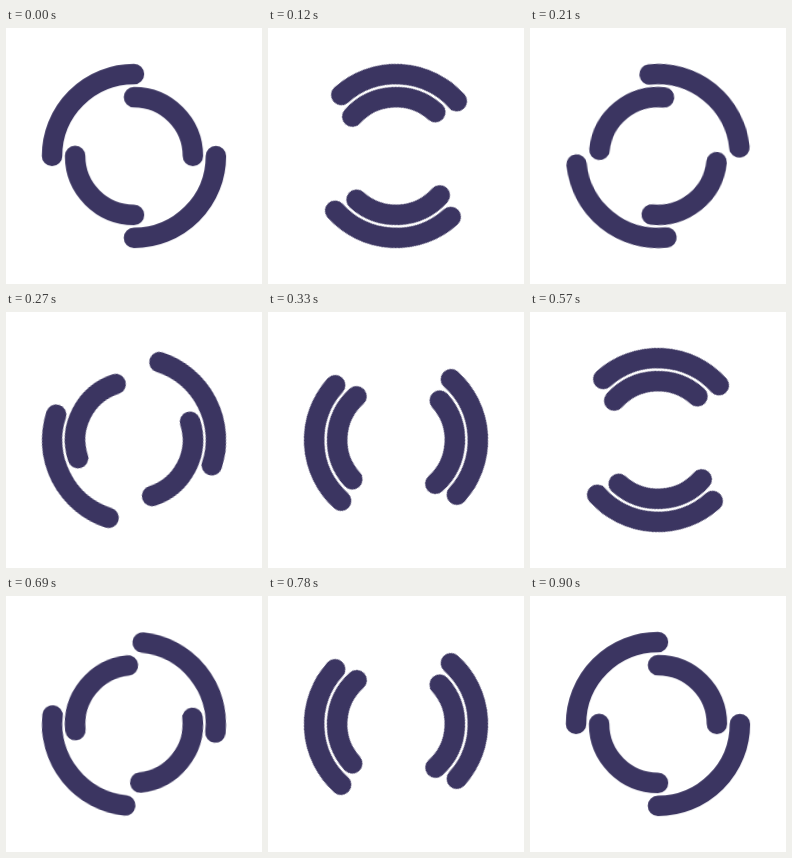
Write an HTML page that moves like this. It is 256 by 256 pixels and loops after 0.93 s.

```html
<!DOCTYPE html>
<html lang="en">
<head>
<meta charset="utf-8">
<title>Double ring spinner</title>
<style>
  html, body { margin: 0; width: 100%; height: 100%; overflow: hidden; background: #fff; }
  svg { display: block; width: 100vw; height: 100vh; }
  .ring {
    fill: none;
    stroke: #3b3561;
    stroke-width: 8;
    stroke-linecap: round;
    transform-origin: 50px 50px;
    /* 31 held poses of 30 ms; the first and last coincide */
    animation: spin 930ms steps(31, jump-none) -1ms infinite;
  }
  .inner { animation-name: spin-back; }
  @keyframes spin { from { transform: rotate(0deg); } to { transform: rotate(360deg); } }
  @keyframes spin-back { from { transform: rotate(0deg); } to { transform: rotate(-360deg); } }
</style>
</head>
<body>
<svg viewBox="0 0 100 100">
  <path class="ring" d="M82 50A32 32 0 0 1 50 82M18 50A32 32 0 0 1 50 18"/>
  <path class="ring inner" d="M50 73A23 23 0 0 1 27 50M50 27A23 23 0 0 1 73 50"/>
</svg>
</body>
</html>
```
